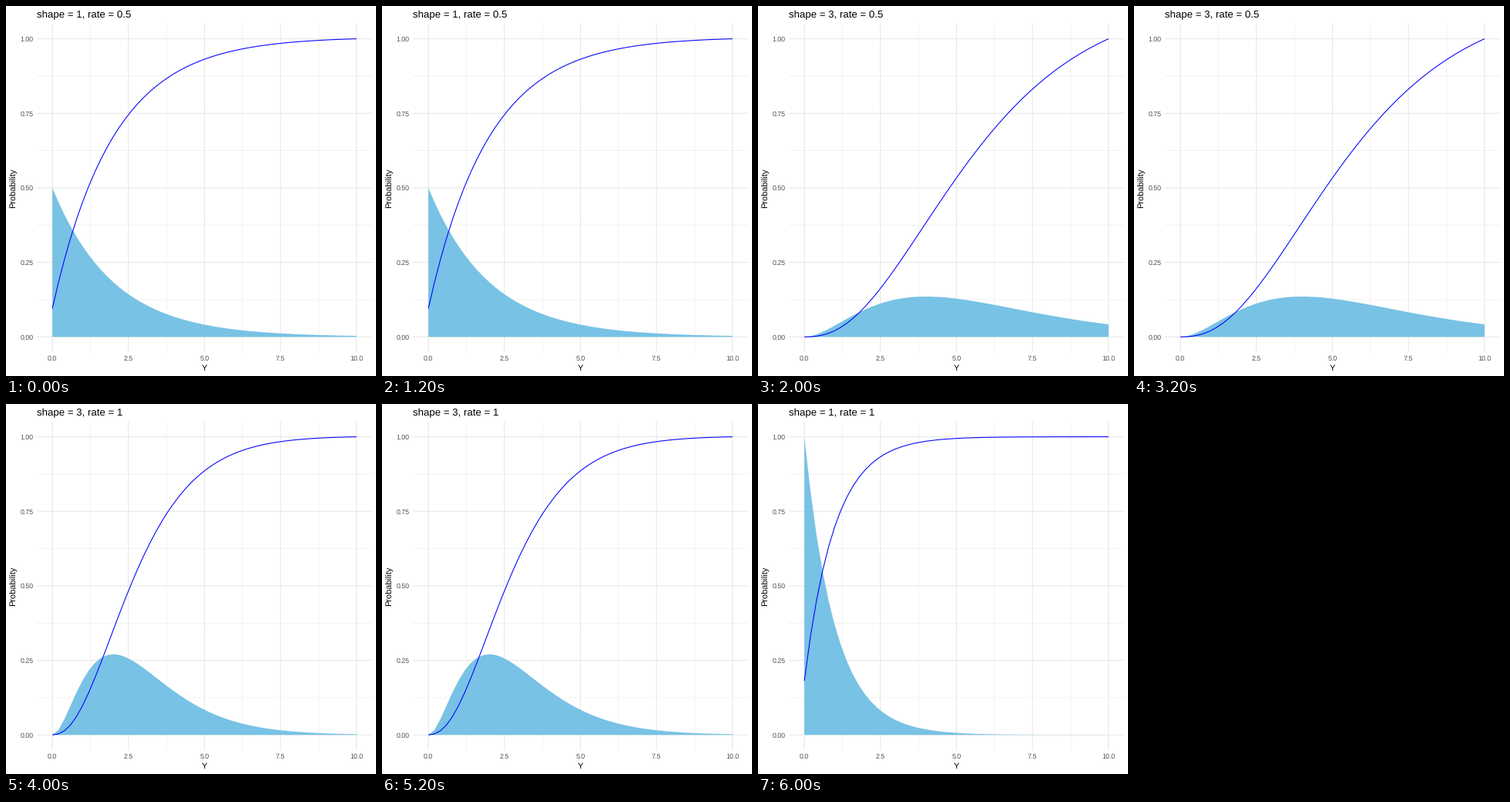
A matplotlib script that plays this animation: 480x480 px, repeating every 8 s.

```python
import math

import numpy as np
import matplotlib.pyplot as plt
from matplotlib.animation import FuncAnimation

plt.rcParams.update({
    "font.family": "Liberation Sans",
    "text.hinting": "none",
    "path.simplify": False,
})

SIZE, DPI = 480, 72  # at 72 dpi one point is one pixel
PANEL = (40.4, 474.5, 23.2, 448.6)  # left, right, top, bottom
SKY, BLUE, GRID, TICK = "#78c2e5", "#0000ff", "#e7e7e7", "#4d4d4d"
SETTINGS = [(1, 0.5), (3, 0.5), (3, 1), (1, 1)]

y_values = np.linspace(0, 10, 51)


def gamma_density(shape, rate):
    return (rate ** shape * y_values ** (shape - 1)
            * np.exp(-rate * y_values) / math.gamma(shape))


fig = plt.figure(figsize=(SIZE / DPI, SIZE / DPI), dpi=DPI, facecolor="white")
left, right, top, bottom = PANEL
ax = fig.add_axes([left / SIZE, 1 - bottom / SIZE,
                   (right - left) / SIZE, (bottom - top) / SIZE])
ax.set(xlim=(-0.5, 10.5), ylim=(-0.05, 1.05))
ax.axis("off")


def label(x, y, text, size, color="black", **kwargs):
    return fig.text(x / SIZE, 1 - y / SIZE, text, fontsize=size, color=color, **kwargs)


def to_pixels(x, y):
    px, py = ax.transData.transform((x, y))
    return px, SIZE - py


for i in range(8):
    width = 0.53 if i % 2 else 1.07
    ax.axvline(i * 1.25, color=GRID, lw=width, zorder=0, snap=False)
    ax.axhline(i * 0.125, color=GRID, lw=width, zorder=0, snap=False)
ax.axvline(10, color=GRID, lw=1.07, zorder=0, snap=False)
ax.axhline(1, color=GRID, lw=1.07, zorder=0, snap=False)

for i in range(5):
    px, py = to_pixels(2.5 * i, 0.25 * i)
    label(px, 460, f"{2.5 * i:.1f}", 8.8, TICK, ha="center", va="baseline")
    label(35.5, py + 3.2, f"{0.25 * i:.2f}", 8.8, TICK, ha="right", va="baseline")

label((left + right) / 2, 473, "Y", 11, ha="center", va="baseline")
label(13, (top + bottom) / 2, "Probability", 11, rotation=90,
      ha="right", va="center", rotation_mode="default").set(
          ha="center", va="baseline", rotation_mode="anchor")
title = label(40.4, 15, "", 13.2, ha="left", va="baseline")

area, = ax.fill([0], [0], color=SKY, lw=0, zorder=1)
curve, = ax.plot([], [], color=BLUE, lw=1.07, zorder=2,
                 solid_capstyle="butt", solid_joinstyle="round")


def update(frame):
    shape, rate = SETTINGS[frame]
    density = gamma_density(shape, rate)
    outline = np.column_stack([y_values, density])
    area.set_xy(np.vstack([[0, 0], outline, [10, 0]]))
    curve.set_data(y_values, np.cumsum(density) / density.sum())
    title.set_text(f"shape = {shape}, rate = {rate}")
    return area, curve, title


animation = FuncAnimation(fig, update, frames=len(SETTINGS), interval=2000,
                          repeat=True, repeat_delay=0)
plt.show()
```
